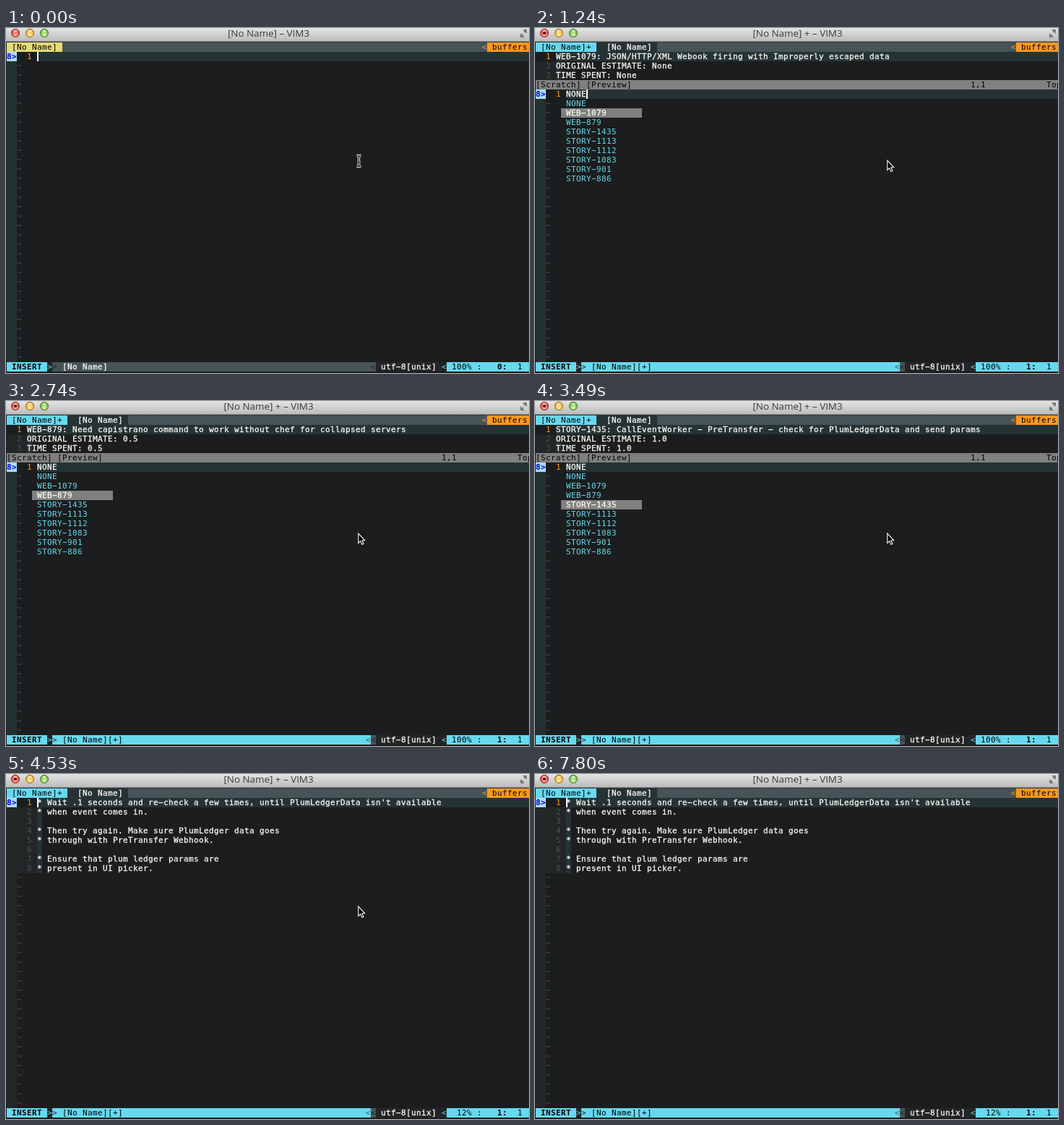
Animation of 724x477 px, one loop 8000 ms. Source, as an HTML page with a canvas:

```html
<!DOCTYPE html>
<html lang="en">
<head>
<meta charset="utf-8">
<title>Editor completion</title>
<style>
html, body { margin: 0; width: 100%; height: 100%; overflow: hidden; background: #1b1d1e; }
canvas { display: block; }
</style>
</head>
<body>
<canvas id="stage" width="724" height="477"></canvas>
<script>
const ctx = document.getElementById('stage').getContext('2d');
const W = 724, H = 477, LOOP = 8000;
const CELL_W = 7, CELL_H = 13, LEFT = 1, TOP = 20;
const STATUS_ROW = 34;
const C = {
  bg: '#1b1d1e', line: '#263335', gutter: '#253032', numBg: '#232526',
  grey: '#465457', dim: '#465457', cyan: '#66d9ef', yellow: '#e6db74',
  orange: '#fd971f', mid: '#808080', white: '#f8f8f2', black: '#000'
};

const MENU = ['NONE', 'WEB-1079', 'WEB-879', 'STORY-1435', 'STORY-1113',
  'STORY-1112', 'STORY-1083', 'STORY-901', 'STORY-886'];

const PREVIEWS = [
  ['PLACEHOLDER', ''],
  ['WEB-1079: JSON/HTTP/XML Webook firing with Improperly escaped data',
    'ORIGINAL ESTIMATE: None', 'TIME SPENT: None'],
  ['WEB-879: Need capistrano command to work without chef for collapsed servers',
    'ORIGINAL ESTIMATE: 0.5', 'TIME SPENT: 0.5'],
  ['STORY-1435: CallEventWorker - PreTransfer - check for PlumLedgerData and send params',
    'ORIGINAL ESTIMATE: 1.0', 'TIME SPENT: 1.0']
];

const NOTES = [
  "* Wait .1 seconds and re-check a few times, until PlumLedgerData isn't available",
  '* when event comes in.',
  '',
  '* Then try again. Make sure PlumLedger data goes',
  '* through with PreTransfer Webhook.',
  '',
  '* Ensure that plum ledger params are',
  '* present in UI picker.'
];

const SELECT_AT = [500, 1240, 2140, 2890];
const PICK_AT = 4530;
// The caret toggles at each of these times, starting visible.
const BLINKS = [1990, 2140, 2740, 2890, 3490, 3790, 4240, 4380,
  5130, 5430, 5880, 6020, 6470, 6770, 7070, 7370];

const colX = c => LEFT + c * CELL_W;
const rowY = r => TOP + r * CELL_H;
const passed = (list, t) => list.filter(at => t >= at).length;

function rect(x, y, w, h, color) {
  ctx.fillStyle = color;
  ctx.fillRect(x, y, w, h);
}

function cells(col, row, count, color) {
  rect(colX(col), rowY(row), count * CELL_W, CELL_H, color);
}

function toEdge(col, row, color) {
  rect(colX(col), rowY(row), W - colX(col), CELL_H, color);
}

function text(str, col, row, color, bold) {
  ctx.font = (bold ? 'bold ' : '') + '11px "DejaVu Sans Mono", monospace';
  ctx.textAlign = 'left';
  ctx.fillStyle = ctx.strokeStyle = color;
  ctx.lineWidth = 0.3;
  [...str].forEach((ch, i) => {
    if (ch === ' ') return;
    const glyph = ch === '-' ? '\u2212' : ch;
    const x = colX(col + i), y = rowY(row) + 10;
    ctx.fillText(glyph, x, y);
    if (color === C.white && !bold) ctx.strokeText(glyph, x, y);
  });
}

function light(x, edge, fill, glow) {
  const g = ctx.createRadialGradient(x, 10, 0.5, x, 7, 6);
  g.addColorStop(0, glow);
  g.addColorStop(0.75, fill);
  g.addColorStop(1, edge);
  ctx.fillStyle = g;
  ctx.beginPath();
  ctx.arc(x, 7, 5.6, 0, 7);
  ctx.fill();
  ctx.strokeStyle = edge;
  ctx.lineWidth = 0.9;
  ctx.stroke();
  ctx.fillStyle = 'rgba(255,255,255,.6)';
  ctx.beginPath();
  ctx.ellipse(x, 4, 2.8, 1.5, 0, 0, 7);
  ctx.fill();
}

function poly(points, fill) {
  ctx.beginPath();
  points.forEach(([x, y]) => ctx.lineTo(x, y));
  ctx.closePath();
  ctx.fillStyle = fill;
  ctx.fill();
}

function titleBar(modified) {
  const g = ctx.createLinearGradient(0, 0, 0, 19);
  g.addColorStop(0, '#e4e4e4');
  g.addColorStop(1, '#b9b9b9');
  rect(0, 0, W, 19, g);
  rect(0, 18, W, 1, '#8a8a8a');
  rect(0, 19, W, 1, '#33393a');
  light(13, '#8e2f2b', '#e9524b', '#ffb3a8');
  light(33, '#9c6a1d', '#f3b63f', '#fff0a8');
  light(53, '#4a7a2c', '#7fc150', '#dcffb0');
  if (modified) {
    ctx.fillStyle = '#4d0d0b';
    ctx.beginPath();
    ctx.arc(13, 7, 2, 0, 7);
    ctx.fill();
  }
  ctx.font = '13.4px "Open Sans", "Noto Sans", sans-serif';
  ctx.textAlign = 'center';
  ctx.fillStyle = '#3a3a3a';
  ctx.fillText(modified ? '[No Name] + \u2013 VIM3' : '[No Name] \u2013 VIM3', 363.5, 12);

  poly([[715, 2], [721, 2], [721, 8]], '#777');
  poly([[712, 7], [712, 13], [718, 13]], '#777');
  ctx.strokeStyle = '#777';
  ctx.lineWidth = 1.6;
  ctx.beginPath();
  ctx.moveTo(719, 4);
  ctx.lineTo(717, 6);
  ctx.moveTo(714, 11);
  ctx.lineTo(716, 9);
  ctx.stroke();
}

function tabLine(modified) {
  toEdge(0, 0, C.grey);
  if (modified) {
    cells(0, 0, 12, C.cyan);
    text('[No Name]+', 1, 0, C.black);
    cells(12, 0, 12, '#273235');
    text('[No Name]', 14, 0, C.white);
  } else {
    cells(0, 0, 11, C.yellow);
    text('[No Name]', 1, 0, C.black);
  }
  text('<', 94, 0, C.orange);
  toEdge(95, 0, C.orange);
  text('buffers', 96, 0, C.black);
}

function statusLine(modified, percent, line) {
  const r = STATUS_ROW;
  cells(0, r, 8, C.cyan);
  text('INSERT', 1, r, C.black, true);
  cells(8, r, 1, C.numBg);
  text('>', 8, r, C.cyan);
  cells(9, r, 64, C.grey);
  if (modified) {
    cells(9, r, 63, C.cyan);
    text('<', 71, r, C.grey);
  }
  text('>', 9, r, C.numBg);
  text(modified ? '[No Name][+]' : '[No Name]', 11, r, modified ? C.black : C.white);
  text('<', 72, r, C.numBg);
  cells(73, r, 14, C.numBg);
  text('utf-8[unix]', 74, r, C.white);
  text('<', 86, r, C.cyan);
  toEdge(87, r, C.cyan);
  text(percent.padStart(4) + ' :', 88, r, C.black);
  text(line + ':', 97, r, C.black, true);
  text('1', 101, r, C.black);
}

function number(n, col, row, current) {
  if (!current) cells(col - 2, row, 4, C.numBg);
  text(String(n), col, row, current ? C.orange : C.dim);
}

function mainWindow(firstRow, lines, gutter) {
  rect(LEFT, rowY(firstRow), 14, rowY(STATUS_ROW) - rowY(firstRow), gutter);
  cells(0, firstRow, 2, '#a9dcf5');
  text('8>', 0, firstRow, '#0000e6', true);
  toEdge(6, firstRow, C.line);
  lines.forEach((str, i) => {
    const row = firstRow + i;
    number(i + 1, 4, row, i === 0);
    if (i) cells(6, row, 1, C.line);
    text(str, 6, row, C.white);
  });
  for (let r = firstRow + lines.length; r < STATUS_ROW; r++) text('~', 2, r, C.dim);
}

function preview(lines) {
  toEdge(4, 1, C.line);
  lines.forEach((str, i) => {
    const row = 1 + i;
    if (i) {
      cells(0, row, 4, C.numBg);
      cells(4, row, 1, C.line);
    }
    text(String(i + 1), 2, row, i ? C.dim : C.orange);
    text(str, 4, row, C.white);
  });
  if (lines.length < 3) text('~', 0, 3, C.dim);
  toEdge(0, 4, C.mid);
  text('[Scratch] [Preview]', 0, 4, C.black);
  text('1,1', 86, 4, C.black);
  text(lines.length < 3 ? 'All' : 'Top', 101, 4, C.black);
}

function menu(selected) {
  MENU.forEach((item, i) => {
    const on = i === selected;
    cells(5, 6 + i, 16, on ? C.mid : C.bg);
    text(item, 6, 6 + i, on ? C.white : C.cyan);
  });
}

function arrow(x, y) {
  ctx.save();
  ctx.translate(x, y);
  ctx.lineJoin = 'miter';
  poly([[0.8, 1.2], [0.8, 14.4], [3.7, 11.6], [5.8, 16.4], [7.9, 15.5],
    [5.9, 10.9], [9.6, 10.6]], '#000');
  ctx.strokeStyle = '#fff';
  ctx.lineWidth = 1.1;
  ctx.stroke();
  ctx.restore();
}

function textPointer(x, y) {
  ctx.beginPath();
  for (const s of [-1, 1]) {
    ctx.moveTo(x - 3, y + s * 8);
    ctx.quadraticCurveTo(x, y + s * 8, x, y + s * 5);
    ctx.quadraticCurveTo(x, y + s * 8, x + 3, y + s * 8);
  }
  ctx.moveTo(x, y - 6);
  ctx.lineTo(x, y + 6);
  ctx.moveTo(x - 2, y + 2);
  ctx.lineTo(x + 2, y + 2);
  for (const [width, color] of [[3.2, '#fff'], [1.2, '#000']]) {
    ctx.lineWidth = width;
    ctx.strokeStyle = color;
    ctx.stroke();
  }
}

function pointer(t) {
  if (t < 500) textPointer(488.5, 184);
  else if (t < 7510) arrow(487, 182);
  else if (t < 7650) arrow(705, 312);
  else if (t < 7800) arrow(687, 382);
}

function draw(t) {
  const modified = t >= 500, picked = t >= PICK_AT;
  rect(0, 0, W, H, C.bg);
  titleBar(modified);
  tabLine(modified);

  let caretCol = 6, caretRow = 1;
  if (!modified) {
    mainWindow(1, [''], C.gutter);
  } else if (!picked) {
    const selected = passed(SELECT_AT, t) - 1;
    preview(PREVIEWS[selected]);
    mainWindow(5, ['NONE'], C.gutter);
    menu(selected);
    caretCol = 10;
    caretRow = 5;
  } else {
    mainWindow(1, NOTES, '#242728');
  }

  statusLine(modified, picked ? '12%' : '100%', modified ? 1 : 0);
  if (passed(BLINKS, t) % 2 === 0) {
    rect(colX(caretCol), rowY(caretRow), 2, CELL_H, '#fff');
  }
  pointer(t);
}

const start = performance.now();
function tick() {
  draw((performance.now() - start) % LOOP);
  requestAnimationFrame(tick);
}
tick();
</script>
</body>
</html>
```
